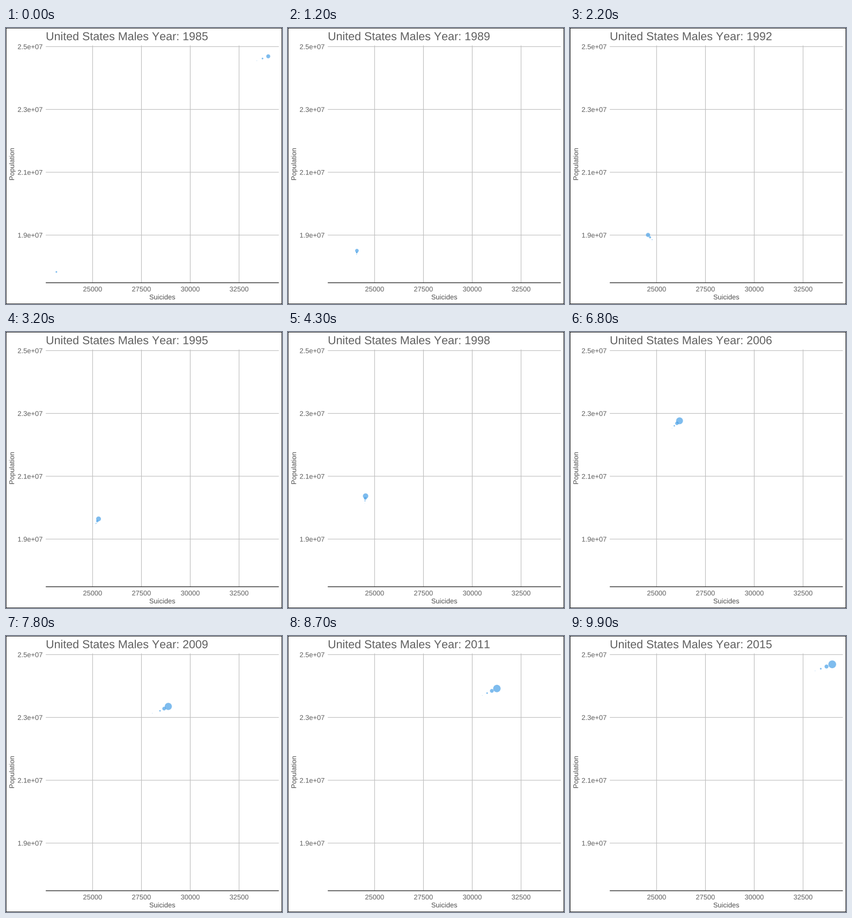
Recreate the animation shown at these times as a matplotlib script. Size 480x480 px, loop 10000 ms.

```python
import numpy as np
import matplotlib.pyplot as plt
from matplotlib.animation import FuncAnimation
from matplotlib.patches import Circle, PathPatch
from matplotlib.textpath import TextPath
from matplotlib.transforms import Affine2D

plt.rcParams["font.family"] = "Liberation Sans"
plt.rcParams["text.kerning_factor"] = 6  # no pair kerning

SIZE, DPI = 480, 96
FRAMES, WAKE = 100, 5
LEFT, RIGHT, TOP, BOTTOM = 69.2, 474.5, 30.5, 443.0
GRID, TEXT, LABEL = "#c0c0c0", "#5f5f5f", "#505050"
DOT = (72 / 255, 160 / 255, 231 / 255, 0.7)

# Yearly values, 1985 to 2015; population in millions
deaths = np.array([
    23145, 24226, 24272, 24078, 24102, 24724, 24769, 24457, 25007, 25174,
    25369, 24998, 24492, 24538, 23458, 23618, 24672, 25409, 25203, 25566,
    25907, 26308, 27269, 28450, 29089, 30277, 31003, 31780, 32055, 33113,
    33994])
people = np.array([
    17.827, 18.02, 18.20, 18.385, 18.565, 18.65, 18.855, 19.08, 19.29, 19.50,
    19.715, 19.93, 20.14, 20.37, 20.60, 21.37, 21.657, 21.91, 22.13, 22.384,
    22.605, 22.845, 22.985, 23.21, 23.42, 23.63, 23.845, 24.07, 24.27, 24.48,
    24.69])


def scale(data, start, end):
    """Map data to pixels with 5% padding at both ends."""
    low, span = data.min(), np.ptp(data)
    return lambda v: start + (end - start) * ((v - low) / span + 0.05) / 1.1


to_x = scale(deaths, LEFT, RIGHT)
to_y = scale(people, BOTTOM, TOP)

# Each year lands on a whole frame; values move linearly in between
steps = np.arange(FRAMES)
keys = np.rint(1 + (FRAMES - 1) * np.arange(31) / 30) - 1
point_size = 1 + 5 * np.sqrt((people - people.min()) / np.ptp(people))
xs = np.interp(steps, keys, to_x(deaths))
ys = np.interp(steps, keys, to_y(people))
radii = np.interp(steps, keys, 0.375 * (2.845 * point_size + 0.945))

fig = plt.figure(figsize=(SIZE / DPI, SIZE / DPI), dpi=DPI, facecolor="white")
ax = fig.add_axes([0, 0, 1, 1])
ax.set(xlim=(0, SIZE), ylim=(SIZE, 0))
ax.axis("off")


def line(x, y, color, width=1.07):
    ax.plot(x, y, color=color, lw=width * 72 / DPI, snap=False,
            solid_capstyle="butt", zorder=1)


def text(s, x, y, size=12, color=TEXT, align=0.0, angle=0):
    path = TextPath((0, 0), s, size=size)
    box = path.get_extents()
    shift = -(box.x0 + box.width * align) if align else 0
    place = (Affine2D().translate(shift, 0).rotate_deg(angle)
             .scale(1, -1).translate(x, y))
    patch = PathPatch(path, fc=color, lw=0, transform=place + ax.transData)
    return ax.add_patch(patch)


for v in (19, 21, 23, 25):
    y = to_y(v)
    line([LEFT, RIGHT], [y, y], GRID)
    text(f"{v / 10}e+07", 63.2, y + 4.4, align=1)
for v in (25000, 27500, 30000, 32500):
    x = to_x(v)
    line([x, x], [TOP, BOTTOM], GRID)
    text(str(v), x, 458.2, align=0.5)

line([LEFT, RIGHT], [BOTTOM, BOTTOM], "black")
line([0, SIZE, SIZE, 0, 0], [0, 0, SIZE, SIZE, 0], "black", 1.4)
text("Suicides", (LEFT + RIGHT) / 2, 472, color=LABEL, align=0.5)
text("Population", 14.2, (TOP + BOTTOM) / 2, color=LABEL, align=0.5, angle=90)


def title_text(frame):
    year = round(1985 + 30 * frame / (FRAMES - 1))
    return f"United States Males Year: {year}"


title = text(title_text(0), LEFT, 21.2, size=20)
dots = [ax.add_patch(Circle((0, 0), 1, fc=DOT, lw=0, zorder=3 + WAKE - k))
        for k in range(WAKE)]


def draw(frame):
    title.set_path(TextPath((0, 0), title_text(frame), size=20))
    for k, dot in enumerate(dots):
        i = (frame - k) % FRAMES
        dot.set_center((xs[i], ys[i]))
        dot.set_radius(radii[i] * (1 - k / WAKE) ** 3)
    return [title, *dots]


anim = FuncAnimation(fig, draw, frames=FRAMES, interval=100,
                     repeat=True, repeat_delay=0, blit=False)
plt.show()
```
